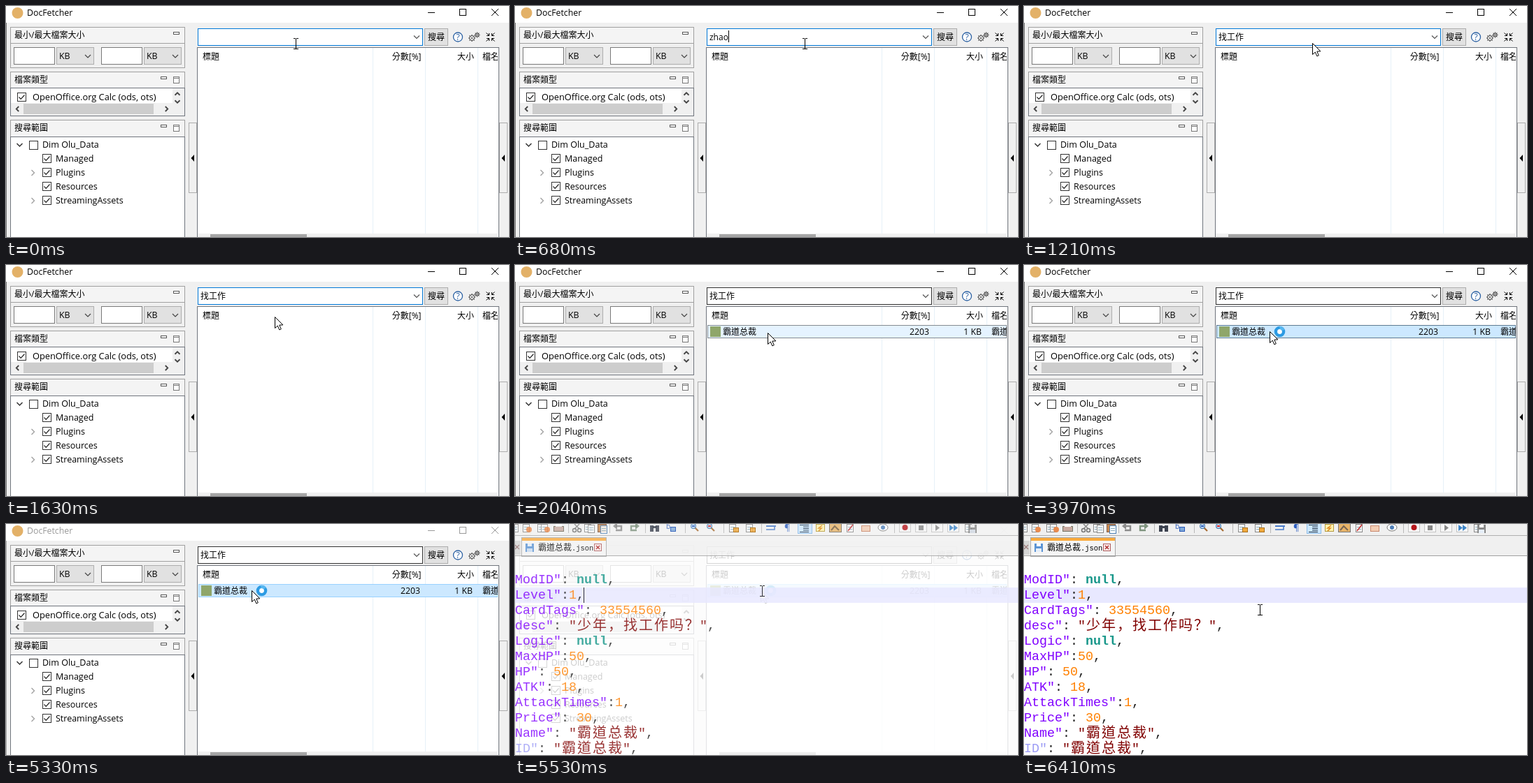
Animation of 719x331 px, one loop 6450 ms. Source, as an HTML page with a canvas:

```html
<!DOCTYPE html>
<html lang="zh-Hant">
<head>
<meta charset="utf-8">
<style>
html, body { margin: 0; width: 100%; height: 100%; overflow: hidden; background: #fff; }
canvas { display: block; }
</style>
</head>
<body>
<canvas id="stage" width="719" height="331"></canvas>
<script>
const g = document.getElementById('stage').getContext('2d');
const LOOP = 6450;
const UI = '"Open Sans", "Noto Sans CJK TC", sans-serif';
const MONO = '"Liberation Mono", "Noto Sans CJK SC", monospace';
const HAN = '"Noto Sans CJK SC", sans-serif';
const GREY = '#a0a0a0', FACE = '#f0f0f0', INK = '#000', EDGE = '#70757d';

function box(x, y, w, h, fill, edge) {
  if (fill) { g.fillStyle = fill; g.fillRect(x, y, w, h); }
  if (edge) { g.strokeStyle = edge; g.lineWidth = 1; g.strokeRect(x + .5, y + .5, w - 1, h - 1); }
}
function text(s, x, y, size = 12, color = INK, align = 'left', font = UI) {
  g.font = `${size}px ${font}`;
  g.textAlign = align;
  g.fillStyle = color;
  g.fillText(s, x, y);
}
function line(points, color = INK, width = 1) {
  g.beginPath();
  points.forEach(([x, y]) => g.lineTo(x, y));
  g.strokeStyle = color;
  g.lineWidth = width;
  g.stroke();
}
function shape(points, fill, edge) {
  g.beginPath();
  points.forEach(([x, y]) => g.lineTo(x, y));
  g.closePath();
  g.fillStyle = fill;
  g.fill();
  if (edge) { g.strokeStyle = edge; g.lineWidth = 1; g.stroke(); }
}
function disc(x, y, r, fill, edge, width = 1) {
  g.beginPath();
  g.arc(x, y, r, 0, 7);
  if (fill) { g.fillStyle = fill; g.fill(); }
  if (edge) { g.strokeStyle = edge; g.lineWidth = width; g.stroke(); }
}
// Chevron pointing along the given quarter turn: 0 right, 1 down, 2 left, 3 up.
function chevron(x, y, turn, size = 4, color = '#444', width = 1.2) {
  g.save();
  g.translate(x, y);
  g.rotate(turn * Math.PI / 2);
  line([[-size / 2, -size], [size / 2, 0], [-size / 2, size]], color, width);
  g.restore();
}
function clipped(x, y, w, h, draw) {
  g.save();
  g.beginPath();
  g.rect(x, y, w, h);
  g.clip();
  draw();
  g.restore();
}
function mix(keys, t) {
  let i = 1;
  while (i < keys.length - 1 && t > keys[i][0]) i++;
  const [a, b] = [keys[i - 1], keys[i]];
  const k = Math.min(1, Math.max(0, (t - a[0]) / (b[0] - a[0])));
  return [a[1] + (b[1] - a[1]) * k, a[2] + (b[2] - a[2]) * k].map(Math.round);
}

function checkbox(x, y, on = true) {
  box(x, y, 13, 13, '#fff', '#333');
  if (on) line([[x + 2.5, y + 6.5], [x + 5.2, y + 9.3], [x + 10.5, y + 3.5]], '#222', 1.2);
}
function panel(y, h, header, title, maximizable) {
  box(6, y, 250, h, FACE, GREY);
  box(7, y + 1, 248, header - 1, '#f4f4f4');
  box(6, y + header, 250, 1, GREY);
  text(title, 12, y + 16);
  box(maximizable ? 221 : 239, y + 7, 9, 4, '#fff', '#555');
  if (maximizable) {
    box(239, y + 7, 9, 10, '#fff', '#777');
    box(239, y + 9, 9, 1, '#777');
    box(6, y + header, 250, h - header, '#fff', EDGE);
  }
}
function unitField(x, width) {
  box(x, 59, width, 25, '#fff', '#7a7a7a');
  box(x + 61, 59, 54, 25, '#e1e1e1', '#adadad');
  text('KB', x + 65, 76, 12.4);
  chevron(x + 106, 72, 1);
}
function splitter(x) {
  box(x, 167, 12, 101, FACE, '#adadad');
  shape([[x + 8, 213], [x + 8, 223], [x + 3.5, 218]], INK);
}
function gear(x, y, r) {
  disc(x, y, r, null, '#444', 1);
  disc(x, y, 1.1, '#444');
  for (let a = 0; a < 8; a++) {
    const c = Math.cos(a * Math.PI / 4), s = Math.sin(a * Math.PI / 4);
    line([[x + c * r, y + s * r], [x + c * (r + 1.6), y + s * (r + 1.6)]], '#444', 1.2);
  }
}

function arrow(x, y) {
  shape([[0, 0], [0, 16], [3.8, 12.6], [6.3, 18.4], [8.8, 17.3], [6.3, 11.6], [11.4, 11.4]]
    .map(([a, b]) => [x + a + .5, y + b + .5]), '#fff', INK);
}
function iBeam(x, y) {
  box(x, y - 7, 1, 15, INK);
  for (const end of [-8, 7]) {
    box(x - 3, y + end, 3, 1, INK);
    box(x + 1, y + end, 3, 1, INK);
  }
}
function busyRing(t) {
  const a = t / 110;
  disc(365.5, 95.5, 5.6, '#fff', '#2c9be3', 4.4);
  g.beginPath();
  g.arc(365.5, 95.5, 5.6, a, a + 1.2);
  g.strokeStyle = '#58b7f0';
  g.stroke();
}

function sidebar() {
  panel(30, 59, 23, '最小/最大檔案大小', false);
  unitField(11, 59);
  unitField(136, 59);

  panel(94, 64, 23, '檔案類型', true);
  box(238, 118, 17, 39, FACE);
  box(7, 139, 248, 18, FACE);
  checkbox(16, 124);
  text('OpenOffice.org Calc (ods, ots)', 38, 135, 12.8);
  chevron(245, 126, 3, 3.5, '#444', 1.8);
  chevron(245, 137, 1, 3.5, '#444', 1.8);
  box(25, 140, 186, 15, '#cdcdcd');
  chevron(16.5, 147.5, 2, 3.5, '#444', 1.8);
  chevron(229.5, 147.5, 0, 3.5, '#444', 1.8);

  panel(163, 180, 24, '搜尋範圍', true);
  chevron(19.5, 199, 1, 4, '#333', 1.5);
  checkbox(33, 193, false);
  text('Dim Olu_Data', 52, 203, 12.5);
  ['Managed', 'Plugins', 'Resources', 'StreamingAssets'].forEach((name, i) => {
    const y = 212 + i * 20;
    checkbox(52, y);
    text(name, 71, y + 11, 12.5);
    if (i % 2) chevron(38.5, y + 7, 0, 4, GREY, 1.3);
  });
}

function resultRow(t) {
  const selected = t >= 2490, hover = t >= 2040;
  if (hover) box(275, 86, 428, 19, selected ? '#cce8ff' : '#e5f3ff');
  if (selected) box(275, 86, 428, 19, null, '#99d1ff');
  if (t < 5080) {
    g.setLineDash([1, 1]);
    box(275, 86, 428, 19, null, '#222');
    g.setLineDash([]);
  }
  box(279, 88, 15, 15, '#8fa66b');
  text('霸道总裁', 297, 100);
  text('2203', 592, 100, 12.3, INK, 'right');
  text('1 KB', 667, 100, 12.3, INK, 'right');
  text('霸道', 681, 100);
}

function searchArea(t) {
  box(274, 32, 322, 25, '#fff', t < 1760 ? '#0078d7' : t < 1890 ? '#315f86' : '#333');
  chevron(587, 44.5, 1, 4, '#555');
  const typed = Math.floor((t - 500) / 55) + 1;
  const query = t >= 1210 ? '找工作' : t >= 500 ? 'zhaogongzuo'.slice(0, typed) : '';
  text(query, 278, 49);
  if (t >= 220 && t < 1210) box(278 + Math.round(g.measureText(query).width), 35, 1, 17, INK);

  box(598, 32, 34, 25, '#e1e1e1', '#adadad');
  text('搜尋', 603, 49);
  disc(646, 44.5, 6.5, '#fff', '#2d62a3', 1.3);
  text('?', 646, 49, 12, '#2d62a3', 'center');
  gear(666, 46, 3.4);
  gear(673.5, 41.5, 2.4);
  for (const dx of [-1, 1]) for (const dy of [-1, 1]) {
    const p = (a, b) => [692.5 + dx * a, 44.5 + dy * b];
    line([p(6, 6), p(2, 2)]);
    line([p(2, 5.5), p(2, 2), p(5.5, 2)]);
  }

  box(273, 59, 432, 280, '#fff', EDGE);
  for (const x of [524, 599, 674]) box(x, 60, 1, 267, '#e6f0f8');
  clipped(274, 60, 429, 271, () => {
    text('標題', 281, 77);
    text('分數[%]', 593.5, 77, 12, INK, 'right');
    text('大小', 669, 77, 12, INK, 'right');
    text('檔名', 681, 77);
    if (t >= 1650) resultRow(t);
    box(274, 326, 429, 5, FACE);
    box(292, 327, 138, 4, '#a6a6a6');
  });
}

const arrowPath = [[1210, 412, 53], [1820, 372, 84], [1890, 367, 93], [2040, 361, 97],
  [2220, 343, 107], [2450, 330, 94], [2880, 330, 94], [3000, 351, 95]];

function finder(t) {
  const active = t < 5080, ink = active ? INK : '#999';
  box(0, 0, 719, 331, FACE);
  box(0, 0, 719, 24, '#fff');
  box(0, 24, 1, 307, active ? '#777' : '#aaa');
  disc(16.5, 10, 8, '#e3b168');
  text('DocFetcher', 30, 14, 12.3, ink);
  box(603, 9, 10, 1, ink);
  box(648, 4, 10, 10, null, ink);
  line([[694, 4], [704, 14]], ink);
  line([[704, 4], [694, 14]], ink);
  sidebar();
  splitter(261);
  splitter(705);
  searchArea(t);

  if (t < 1210) return iBeam(414, 54);
  const [x, y] = mix(arrowPath, t);
  const pressed = (t >= 2490 && t < 2670) || (t >= 3280 && t < 3340) || (t >= 3400 && t < 3460);
  if (pressed) disc(x + .5, y + .5, 12, 'rgba(245, 225, 40, .7)');
  if (t >= 3970) busyRing(t);
  arrow(x, y);
}

const fields = [['ModID', ' null'], ['Level', '1'], ['CardTags', ' 33554560'],
  ['desc', ' "少年，找工作吗？"'], ['Logic', ' null'], ['MaxHP', '50'], ['HP', ' 50'], ['ATK', ' 18'],
  ['AttackTimes', '1'], ['Price', ' 30'], ['Name', ' "霸道总裁"'], ['ID', ' "霸道总裁"']];

function code(s, x, y, color, weight = 'normal') {
  for (const ch of s) {
    const wide = ch > '\u2e80';
    if (wide) text(ch, x + 1, y + 1, '300 20', color, 'left', HAN);
    else text(ch, x, y, `${weight} 18.33`, color, 'left', MONO);
    x += wide ? 22 : 11;
  }
  return x;
}

function page(x, y = 0, edge = '#888') {
  box(x, y, 10, 12, '#fff', edge);
  box(x + 2, y + 4, 6, 1, '#8ab');
  box(x + 2, y + 7, 6, 1, '#8ab');
}
function floppy(x, y, color) {
  box(x, y, 12, 12, color);
  box(x + 3, y, 6, 4, '#fff');
  box(x + 2, y + 7, 8, 5, '#e6eef8');
}
function cross(x, y, size, color) {
  line([[x, y], [x + size, y + size]], color, 1.4);
  line([[x + size, y], [x, y + size]], color, 1.4);
}
function lens(x, color) {
  line([[x + 6, 5], [x + 11, 10]], '#a66a30', 2.2);
  disc(x + 4, 3, 3.4, '#cfe6fa', '#4a7fb5', 1.2);
  box(x + 2, 2, 4, 2, color);
}
function padlock(x) {
  page(x);
  box(x + 6, 5, 8, 7, '#f0a93c', '#a87020');
}

function toolbar() {
  for (const x of [76, 135, 186, 243, 298, 352, 542]) box(x, 0, 1, 13, '#b8b8b8');
  page(-5);
  page(11); disc(20, 8, 4, '#e88a4e');
  page(32); page(37); disc(46, 8, 4, '#e88a4e');
  box(55, 3, 15, 8, '#c9a9a0', '#776'); box(58, 0, 9, 4, '#fff');
  cross(85, 0, 7, '#888'); disc(85, 9, 2.5, null, '#777', 1.5); disc(92, 9, 2.5, null, '#777', 1.5);
  page(99); page(104, 1);
  box(118, 0, 13, 12, '#c98a50', '#865'); page(122, 2, '#4a7fb5');
  line([[144, 9], [152, 9], [152, 3], [144, 3]], '#8c8c8c', 2.4); shape([[140, 3], [146, -2], [146, 8]], '#8c8c8c');
  line([[174, 9], [166, 9], [166, 3], [174, 3]], '#7f947f', 2.4); shape([[178, 3], [172, -2], [172, 8]], '#7f947f');
  box(193, 2, 5, 9, '#3d4350'); box(201, 2, 5, 9, '#3d4350'); box(197, 3, 5, 3, '#3d4350');
  text('b', 216, 7, 10, '#2858b8'); box(222, 4, 8, 7, '#7fa8d8', '#2858b8');
  lens(251, '#2858b8'); lens(274, '#d22');
  padlock(306); padlock(330);
  box(359, 2, 14, 2, '#4678c8'); line([[359, 8], [371, 8], [371, 4]], '#4678c8', 1.5);
  text('¶', 385, 10, 13, '#3060c0');
  box(404, -1, 21, 15, '#cce8ff', '#8cbce8');
  for (let i = 0; i < 5; i++) box(i % 4 ? 412 : 407, 1 + i * 2.5, i % 4 ? 8 : 13, 1, '#234');
  box(430, 0, 13, 11, '#fff3b0', '#b59a40'); line([[439, 2], [434, 6], [438, 6], [434, 10]], '#e08a20', 1.6);
  box(449, -1, 18, 13, '#e8b469', '#777'); line([[452, 9], [457, 3], [463, 9]], '#765', 2);
  page(474); line([[476, 10], [483, 1]], '#c33', 1.6);
  box(495, 2, 13, 9, '#f3cdb4', '#c98a70');
  g.beginPath(); g.ellipse(526, 5, 7, 5, 0, 0, 7); g.fillStyle = '#fff'; g.fill();
  g.strokeStyle = '#777'; g.lineWidth = 1; g.stroke(); disc(526, 5, 3, '#4f7fb8');
  for (const x of [549, 572, 595, 618]) box(x, -2, 17, 14, '#f7f7f7', '#c4c4c4');
  disc(557.5, 5, 4, '#b5171c');
  box(577, 2, 7, 7, '#888');
  shape([[601, 1], [601, 10], [607, 5.5]], '#888');
  for (const x of [621, 627]) shape([[x, 1], [x, 10], [x + 6, 5.5]], '#3f86c8');
  page(643); floppy(648, 1, '#8a8a8a');
}

function editor(t) {
  box(0, 0, 719, 331, '#fff');
  box(0, 0, 719, 45, FACE);
  toolbar();
  box(0, 16, 719, 1, '#b0b0b0');
  box(0, 24, 8, 20, '#d6d6d6');
  cross(0, 30, 6, '#a08080');
  box(9, 19, 122, 28, '#f5f5f5', '#a8a8a8');
  box(10, 20, 120, 4, '#faaa3c');
  floppy(15, 28, '#5c94d4');
  text('霸道总裁', 33, 38, 12, INK, 'left', HAN);
  text('.json', 81, 38, 10.4, INK, 'left', MONO);
  box(113, 28, 11, 11, '#f8e9e9', '#b06060');
  cross(116, 31, 5, '#b03030');
  box(0, 45, 719, 1, GREY);

  box(0, 91, 719, 22, '#e8e8ff');
  fields.forEach(([key, value], i) => {
    const y = 85 + i * 22;
    let x = code(key + '"', 0, y, i === 11 ? '#9c9cf5' : '#8000ff');
    x = code(':', x, y, '#222');
    if (value.includes('null')) x = code(value, x, y, '#18978a', 'bold');
    else x = code(value, x, y, value.includes('"') ? '#800000' : '#ff8000');
    code(',', x, y, '#222');
  });
  if (t < 5930) box(98, 91, 1, 22, INK);
  iBeam(...mix([[6245, 353, 96], [6410, 337, 123]], t));
}

function render(t) {
  if (t < 5580) finder(t);
  if (t >= 5470) {
    g.globalAlpha = t < 5525 ? .4 : t < 5580 ? .8 : 1;
    editor(t);
    g.globalAlpha = 1;
  }
}

const start = performance.now();
(function tick() {
  render((performance.now() - start) % LOOP);
  requestAnimationFrame(tick);
})();
</script>
</body>
</html>
```
